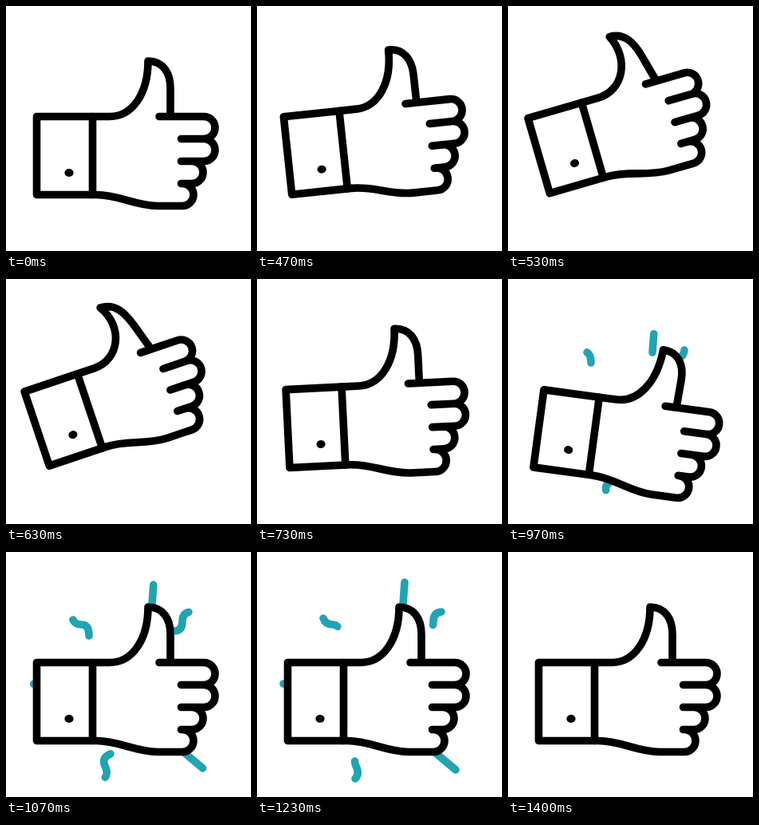
Recreate the animation shown at these times as an HTML page. Size 307 by 307 pixels, loop 2500 ms.

```html
<!DOCTYPE html>
<html lang="en">
<head>
<meta charset="utf-8">
<title>Thumbs up</title>
<style>
  html, body { margin: 0; width: 100%; height: 100%; overflow: hidden; background: #fff; }
  svg { display: block; width: 100%; height: 100%; }
  path { stroke-width: 9.6; stroke-linecap: round; stroke-linejoin: round; }
  #rays path { fill: none; stroke: #20a4b3; }
  #hand path { fill: #fff; stroke: #000; }
</style>
</head>
<body>
<svg viewBox="0 0 307 307">
  <g id="rays">
    <path pathLength="1" d="M104 105Q104 91 95 91T83 83"/>
    <path pathLength="1" d="M181 92L185 38"/>
    <path pathLength="1" d="M212 99Q221 98 221 87T231 75"/>
    <path pathLength="1" d="M131 253Q119 258 124 268T123 284"/>
    <path pathLength="1" d="M205 236L249 273"/>
    <path pathLength="1" d="M62 172L33 165"/>
  </g>
  <g id="hand">
    <path id="palm"/>
    <path d="M38.5 138.5H108.5V236.5H38.5Z"/>
    <ellipse cx="79" cy="209" rx="5.6" ry="5"/>
  </g>
</svg>
<script>
const LOOP = 2500, FPS = 0.03;
const hand = document.getElementById('hand');
const palm = document.getElementById('palm');
const rays = document.querySelectorAll('#rays path');

const clamp = x => Math.min(1, Math.max(0, x));
const phase = (t, from, to) => clamp((t - from) / (to - from));
const smooth = x => x * x * (3 - 2 * x);
const sineOut = x => Math.sin(x * Math.PI / 2);

// bend > 0 leans the thumb back and curls the fingers, bend < 0 leans it forward
function palmPath(bend) {
  const tip = 178 - 16 * bend;
  const curl = 7 * Math.max(0, bend);
  const fingers = [248, 248, 233, 221].map((reach, i) =>
    `H${reach - curl * (1 - 0.4 * i)}a14 14 0 0 1 0 28H${219.5 - curl}`);
  return `M108.5 138.5H130
    C${158 + 7 * bend} 138.5 ${178 + 4 * bend} ${110 - 10 * bend} ${tip} 69
    C${tip + 19} 69 ${206 - 17 * bend} 84 ${206 - 11 * bend} 103
    L206 138.5H192${fingers.join('')}
    H190C160 250 142 236.5 113 236.5H108.5`;
}

function tilt(t) {
  if (t < 600) return -20 * sineOut(phase(t, 434, 600));
  if (t < 870) return -20 + 35 * smooth(phase(t, 600, 870));
  return 15 * (1 - smooth(phase(t, 870, 1066)));
}

function draw(time) {
  const t = Math.floor((time % LOOP) * FPS + 0.15) / FPS;
  const angle = tilt(t);
  // The thumb only gives way once the tilt passes 6 degrees
  const bend = -Math.sign(angle) * Math.max(0, Math.abs(angle) - 6) / 12.5;
  hand.setAttribute('transform', `rotate(${angle} 39 187)`);
  palm.setAttribute('d', palmPath(bend));

  const head = sineOut(phase(t, 910, 1110));
  const tail = smooth(phase(t, 1120, 1400));
  rays.forEach(ray => {
    ray.style.visibility = head > tail ? 'visible' : 'hidden';
    ray.setAttribute('stroke-dasharray', `${head - tail} 3`);
    ray.setAttribute('stroke-dashoffset', -tail);
  });
}

const start = performance.now();
(function tick() {
  draw(performance.now() - start);
  requestAnimationFrame(tick);
})();
</script>
</body>
</html>
```
